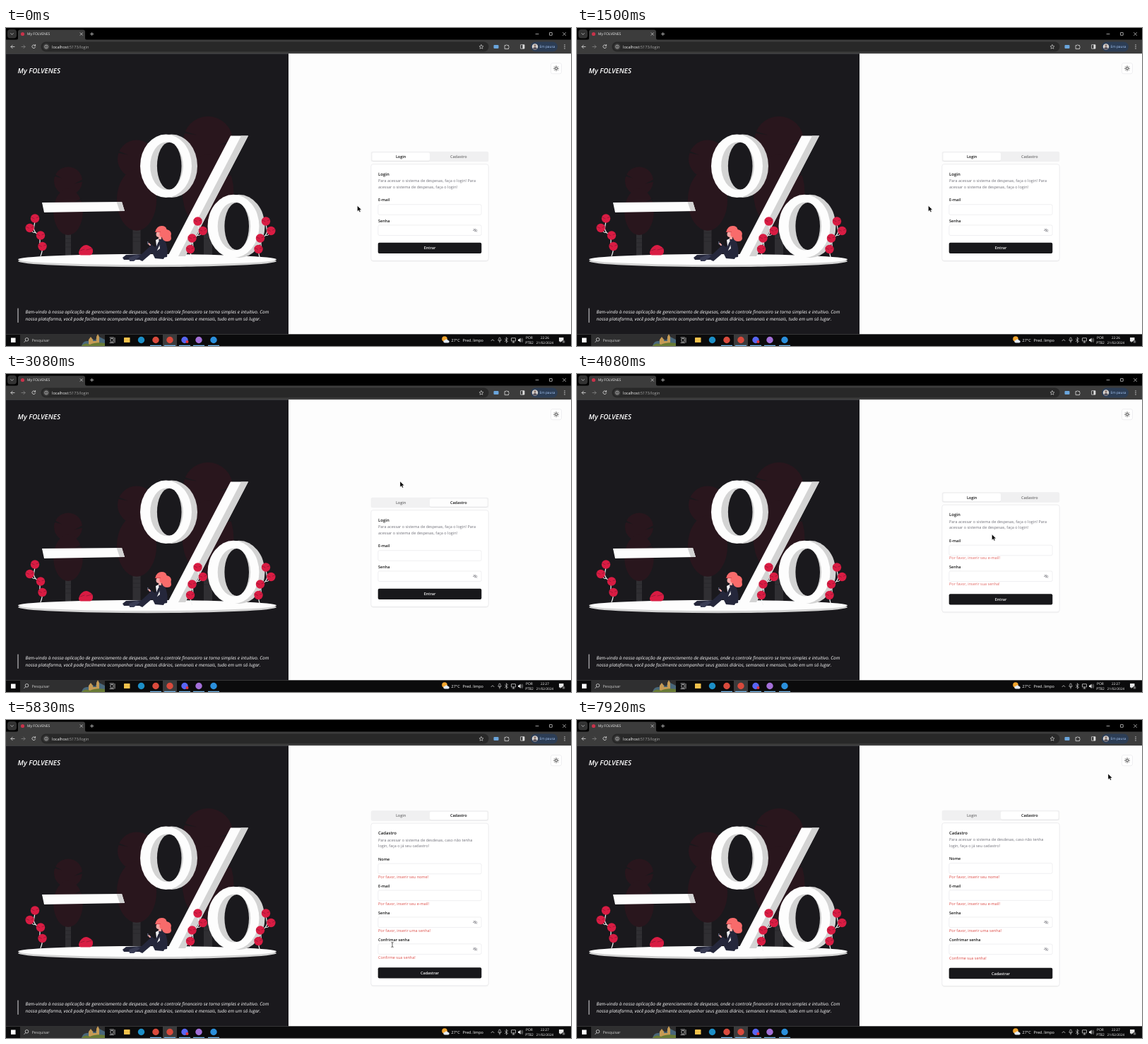
Write an HTML page that moves like this. It is 800 px wide and 450 px high and loops after 8 s.

```html
<!DOCTYPE html>
<html lang="pt">
<head>
<meta charset="utf-8">
<title>My FOLVENES</title>
<style>
html, body { margin: 0; height: 100%; overflow: hidden; background: #fdfdfd; }
svg { display: block; width: 100vw; height: 100vh; }
text { font-family: "Open Sans", "Noto Sans", sans-serif; font-size: 5.5px; text-rendering: geometricPrecision; white-space: pre; }
.mid { text-anchor: middle; }
.semi { font-weight: 600; }
.ital { font-style: italic; fill: #fff; }
.line { fill: none; stroke-linecap: round; stroke-linejoin: round; }
</style>
</head>
<body>
<svg id="stage" viewBox="0 0 800 450"></svg>
<script>
const LOOP = 8000, FONT = 5.5;
const stage = document.getElementById('stage');

const rect = (x, y, w, h, fill, r = 0, more = '') =>
  `<rect x="${x}" y="${y}" width="${w}" height="${h}" rx="${r}" fill="${fill}" ${more}/>`;
const oval = (x, y, rx, ry, fill) => `<ellipse cx="${x}" cy="${y}" rx="${rx}" ry="${ry}" fill="${fill}"/>`;
const dot = (x, y, r, fill) => oval(x, y, r, r, fill);
const shape = (d, fill, more = '') => `<path d="${d}" fill="${fill}" ${more}/>`;
const line = (d, color, w = .7) => `<path class="line" d="${d}" stroke="${color}" stroke-width="${w}"/>`;
const box = (x, y, w, h, color) => rect(x, y, w, h, 'none', .3, `stroke="${color}" stroke-width=".7"`);
const ring = (x, y, r, color, w = .7) => `<circle cx="${x}" cy="${y}" r="${r}" fill="none" stroke="${color}" stroke-width="${w}"/>`;
const text = (x, y, s, fill, size = FONT, cls = '', more = '') =>
  `<text x="${x}" y="${y}" fill="${fill}" style="font-size:${size}px" class="${cls}" ${more}>${s}</text>`;
const at = (x, y, s) => `<g transform="translate(${x} ${y})">${s}</g>`;

function browser() {
  const ink = '#dedede';
  return rect(0, 0, 800, 36.2, '#3c3c3c') + rect(0, 0, 800, 16.5, '#000') +
    rect(2, 2, 13, 12.5, '#333', 4) + line('M6.7 7.6l1.8 1.8 1.8-1.8', ink) +
    shape('M14 17q3 0 3-3V5.5q0-3 3-3h89q3 0 3 3V14q0 3 3 3z', '#3c3c3c') +
    dot(23.5, 8.5, 2.6, '#c8324a') + text(30, 10.4, 'My FOLVENES', '#eee', 5) +
    line('M105 6.8l3.4 3.4m0-3.4l-3.4 3.4M119.5 8.5h4.4m-2.2-2.2v4.4M750 8.5h4M788.5 6.5l4 4m0-4l-4 4', ink) +
    box(769.5, 6.5, 3.8, 3.8, ink) +
    line('M12 26.5H7m2.2-2.3L7 26.5l2.2 2.3', ink, .8) +
    line('M22 26.5h5m-2.2-2.3l2.2 2.3-2.2 2.3', '#858585', .8) +
    line('M41.3 24.8a2.4 2.4 0 1 0 .3 2.3M41.6 23.5v1.7h-1.7', ink, .8) +
    rect(49.5, 19.5, 634, 14, '#282828', 7) + dot(57, 26.5, 4.7, '#3c3c3c') +
    ring(57, 26.5, 2.4, ink, .6) + line('M57 26.3v1.3M57 25.2v.1', ink, .6) +
    text(65, 28.5, 'localhost<tspan fill="#a5a5a5">:5173/login</tspan>', '#f2f2f2', 5.6) +
    line('M673 23.7l.9 1.9 2.1.2-1.6 1.4.5 2.1-1.9-1.1-1.9 1.1.5-2.1-1.6-1.4 2.1-.2z', ink, .6) +
    rect(690.5, 24, 7, 5, '#6aa5dc', 1) +
    line('M706.5 24.5h1.5q.8-1.8 1.6 0h2v1.8q1.8.8 0 1.6v1.7h-5.1z', ink, .8) +
    box(728.5, 23.7, 5.5, 5.5, ink) + rect(731.5, 23.7, 2.5, 5.5, ink) +
    rect(743, 19.5, 38, 14, '#2c3d55', 7) + dot(749, 26.5, 4.2, '#d8d5d2') +
    shape('M745.8 29q3.2-3.8 6.4 0q-3.2 3-6.4 0z', '#55505a') + dot(749, 25, 1.7, '#8d7971') +
    text(755.5, 28.2, 'Em pausa', '#a9c9f8', 4.8) +
    [24, 26.5, 29].map(y => dot(791, y, .65, ink)).join('');
}

function tree(x, top, r, base, trunk) {
  const notch = (y, s) => shape(`M${x + s * r} ${y - 4}L${x + s * r * .45} ${y + 2}L${x + s * r} ${y - 1}z`, '#1a191d');
  const low = top + r * 1.8, leaf = '#29161d';
  return rect(x - trunk / 2, base - 10, trunk, 332 - base, '#302f33') +
    [4, 10, 16, 22].map(d => line(`M${x - trunk / 2} ${base + d}h${trunk}`, '#232227', .6)).join('') +
    dot(x, top + r, r, leaf) + oval(x, (low + base) / 2, r * 1.04, (base - low) / 2 + r * .25, leaf) +
    notch(top + r * .7, -1) + notch(top + r * 1.1, 1) + notch(low + r * .6, 1);
}

const zero = (x, y) => at(x, y,
  oval(8, 0, 36.5, 44.7, '#d3d3d3') + oval(0, 0, 36.5, 44.7, '#fdfdfd') +
  oval(1, 0, 23.3, 34, '#d3d3d3') + oval(4.7, 0, 17.3, 33.4, '#1a191d'));

function plant(x, y, flip) {
  const berry = ([dx, dy]) => at(x + dx * flip, y + dy,
    dot(0, 0, 6.2, '#d91c43') + line('M-5.6-1.8L-1 .3M5.6-2.2L2-.8', '#7c1730', .6));
  const stem = line('M0 0c0 12-3 12-1 17s9 7 8 16s-1 5 3 8q1 5-2 12', '#f5f5f5', 1.2) + line('M-7 13q2 8 7 7', '#f5f5f5', 1);
  return `<g transform="translate(${x} ${y}) scale(${flip} 1)">${stem}</g>` +
    [[0, 0], [-7.3, 13.5], [8, 24], [10.5, 39.5]].map(berry).join('');
}

function reader() {
  const navy = '#25273b', skin = '#f5a9a6';
  return shape('M228 317L212 313 205 308 192 320 170 321 165 325 167 328 189 328 193 330 207 318 211 326 223 327z', navy) +
    shape('M174 325l11-4 5 2-9 7-6 0z', '#393c54') +
    shape('M213 299q8-3 12 2q5 10 3 23l-13 2-4-12z', navy) +
    shape('M212 300l4-2 2 14-4 3z', '#f3f3f3') +
    line('M217 304l-4 9-9-6', navy, 3.2) + line('M204 307l-2-2', skin, 2) + rect(200, 302, 1.5, 4, '#55586e') +
    dot(216.5, 292, 4, skin) + rect(216, 294, 4, 5, skin) +
    shape('M211.5 288q2-8 9-8q6 0 7 5q8 2 6 9q2 8-5 8q-6 0-8-6q-4-1-3-7z', '#f86b6b') +
    line('M211.5 288.5h7', '#d94c53', 1.2);
}

function scene() {
  return rect(0, 36.2, 400, 397.2, '#1a191d') +
    text(16.5, 63.8, 'My FOLVENES', '#fff', 9.8, 'ital semi') +
    tree(88, 196.5, 20, 288, 8) + tree(185, 158.5, 27, 280, 11) + tree(286, 125, 35, 276, 12) +
    oval(200, 330, 183, 8.2, '#d3d3d3') + oval(200, 327.5, 183, 7.6, '#fdfdfd') +
    shape('M51 247L164 246 168 259 54 261z', '#fdfdfd') + shape('M156.5 246H164L168 259H161z', '#d3d3d3') +
    shape('M318 152.5H343L254 323H229z', '#fdfdfd') + shape('M333 152.5H343L254 323H244z', '#d3d3d3') +
    zero(226.5, 195.2) + zero(322, 280.5) +
    plant(41, 269.5, 1) + plant(271.5, 273.5, -1) + plant(368, 273.5, -1) +
    shape('M103 319q0-5 4-9q5-5 10-2q7 3 6 9q-1 4-4 4.5h-13q-2 0-3-2.5z', '#d91c43') +
    line('M105 315l6-2M114 314l8-2', '#7c1730', .6) + reader() +
    line('M17 397V416.5', '#f4f4f5', .9) +
    text(27.5, 404, 'Bem-vindo à nossa aplicação de gerenciamento de despesas, onde o controle financeiro se torna simples e intuitivo. Com', '#fff', 6.49, 'ital') +
    text(27.5, 414, 'nossa plataforma, você pode facilmente acompanhar seus gastos diários, semanais e mensais, tudo em um só lugar.', '#fff', 6.49, 'ital');
}

function themeButton() {
  let rays = '';
  for (let i = 0; i < 8; i++) {
    const c = Math.cos(i * Math.PI / 4), s = Math.sin(i * Math.PI / 4);
    rays += `M${779 + 2.7 * c} ${57.2 + 2.7 * s}L${779 + 3.5 * c} ${57.2 + 3.5 * s}`;
  }
  return rect(771.5, 49.7, 15, 15, '#fff', 2.3, 'stroke="#e4e4e7" stroke-width=".6"') +
    ring(779, 57.2, 1.6, '#222', .8) + line(rays, '#222', .8);
}

function taskbar() {
  const ink = '#e6e6e6';
  const apps = [[212, '#d94a3c'], [232, '#d94a3c'], [253, '#5865f2'], [273, '#a36fd8'], [294, '#2a8fdc']];
  return rect(0, 433.3, 800, 17, '#0b0b0c') + rect(7, 438.5, 6.5, 6.5, '#fff') +
    rect(20, 433.3, 120, 17, '#2f2f30') +
    ring(29.5, 440.8, 2.3, '#ddd', .8) + line('M27.8 442.6l-2 2', '#ddd', .8) +
    text(36.5, 443.7, 'Pesquisar', '#c9c9c9') +
    shape('M107 450q2-8 9-7l4-4 6 3 4-6 10 5v9z', '#49677a') + shape('M117 450v-9l3-4 3 4v2h5v-6l2-4 2 4v13z', '#c69b55') +
    shape('M107 450q5-6 12-2q8-4 21-2v4z', '#687a34') +
    box(148, 439.5, 4, 4.5, ink) + line('M147 438h5.5M147 445.5h5.5M154 438.5v6.5', ink) +
    rect(167, 438, 8.5, 7, '#f2c14b', .6) + dot(191.5, 441.5, 4.7, '#1c8fc7') +
    rect(222, 433.3, 20, 17, '#3b3b3c') +
    apps.map(([x, c]) => dot(x, 441.5, 4.7, c) + rect(x - 8, 448.8, 16, 1.2, '#76b9ed')).join('') +
    dot(256.5, 444, 2, '#e5353f') +
    dot(621, 440, 3.8, '#f2a52e') + shape('M621 445.5a1.9 1.9 0 0 1 .5-3.8a2.4 2.4 0 0 1 4.4.4a1.7 1.7 0 0 1 .2 3.4z', '#e3ebf5') +
    text(630.5, 443.7, '27°C', '#fff') + text(646.5, 443.7, 'Pred. limpo', '#fff') +
    line('M687 442.7l2-2 2 2', ink) + rect(697.8, 438, 2.4, 4.5, 'none', 1.2, `stroke="${ink}" stroke-width=".6"`) +
    line('M696.5 441.5q2.5 4 5 0M699 443.5v1.8M708.5 438v7M706.5 440l4 3.5-2 1.5M706.5 443.5l4-3.5-2-2', ink, .6) +
    box(715.5, 438.7, 6, 4.3, ink) + line('M717 445h3M718.5 443v2', ink, .6) +
    shape('M725 440.5h1.5l2-2v6.5l-2-2H725z', ink) + line('M729.5 440q1 1.7 0 3.5M731 439q1.5 2.7 0 5.5', ink, .5) +
    text(741, 439.7, 'POR', '#fff', 4.9, 'mid') + text(741, 447.2, 'PTB2', '#fff', 4.9, 'mid') +
    text(763, 439.7, '22:26', '#fff', 4.7, 'mid', 'id="clock"') + text(763, 447.2, '21/02/2024', '#fff', 4.6, 'mid') +
    shape('M783 438h6.5v5.5h-3.2l-1.6 1.8v-1.8H783z', ink) + dot(789.5, 444, 2.3, '#3a3a3b') + text(789.5, 445.3, '4', '#fff', 3.6, 'mid');
}

const pages = {
  login: {
    title: 'Login', send: 'Entrar',
    lines: ['Para acessar o sistema de despesas, faça o login! Para', 'acessar o sistema de despesas, faça o login!'],
    fields: [['E-mail', 'Por favor, inserir seu e-mail!'], ['Senha', 'Por favor, inserir sua senha!', 1]]
  },
  join: {
    title: 'Cadastro', send: 'Cadastrar',
    lines: ['Para acessar o sistema de desdesas, caso não tenha', 'login, faça o já seu cadastro!'],
    fields: [['Nome', 'Por favor, inserir seu nome!'], ['E-mail', 'Por favor, inserir seu e-mail!'],
      ['Senha', 'Por favor, inserir uma senha!', 1], ['Confrimar senha', 'Confirme sua senha!', 1]]
  }
};
const clamp = v => Math.max(0, Math.min(1, v));
const mix = (a, b, k) => a + (b - a) * k;
const grey = (a, b, k) => { const v = Math.round(mix(a, b, k)); return `rgb(${v},${v},${v + 1})`; };

// Times of the clicks on tabs and submit buttons
const JOIN_1 = 2400, LOGIN = 3070, SUBMIT_1 = 3920, JOIN_2 = 4420, SUBMIT_2 = 5590;
const fade = (t, start) => clamp((t - start) / 150);
const grow = (t, start) => 1 - (1 - clamp((t - start) / 350)) ** 3;

const eye = (x, y) => at(x, y,
  line('M-2.6 0q2.6-3.6 5.2 0q-2.6 3.6-5.2 0zM-2.2-2.2l4.4 4.4', '#71717a', .6) + dot(0, 0, .7, '#71717a'));

function form(t, mx, my) {
  const joining = t >= JOIN_2 || (t >= JOIN_1 && t < LOGIN);
  const page = joining ? pages.join : pages.login;
  const open = grow(t, joining ? SUBMIT_2 : SUBMIT_1);
  const step = 29.2 + 8.95 * open, n = page.fields.length;
  const h = 78.1 + step * n, top = 261 - h / 2;
  const k = fade(t, JOIN_1) - fade(t, LOGIN) + fade(t, JOIN_2);
  const tab = (x, label, on) =>
    rect(x, top - 16.4, 81.7, 11.5, '#fff', 1.8, `opacity="${on}" filter="url(#soft)"`) +
    text(x + 40.8, top - 8.7, label, grey(113, 15, on), FONT, 'mid semi');
  let s = rect(516.7, top - 18, 166.6, 14.6, '#f0f0f1', 2.5) + tab(518.3, 'Login', 1 - k) + tab(600, 'Cadastro', k) +
    rect(516.9, top, 166.2, h, '#fff', 3, 'stroke="#e4e4e7" stroke-width=".6" filter="url(#soft)"') +
    text(527, top + 16.2, page.title, '#111', 6, 'semi') +
    page.lines.map((l, i) => text(527, top + 25.7 + i * 8.35, l, '#71717a')).join('');
  page.fields.forEach(([label, error, secret], i) => {
    const y = top + 50.5 + i * step;
    s += text(527, y + 2.2, label, '#111', FONT, 'semi') +
      rect(526.9, y + 6.5, 146.2, 14.6, '#fff', 2, 'stroke="#e4e4e7" stroke-width=".6"');
    if (secret) s += eye(664.5, y + 13.8);
    if (open > 0) s += text(527, y + 19 + 8.95 * open, error, '#dc4a45', FONT, '', `opacity="${open}"`);
  });
  const mid = top + 60.2 + step * n;
  const over = mx > 527 && mx < 673 && Math.abs(my - mid) < 7.5;
  return s + rect(526.7, mid - 7.7, 146.6, 15.4, over ? '#2f2f32' : '#18181b', 2) +
    text(600, mid + 2.1, page.send, '#fafafa', FONT, 'mid semi');
}

// Pointer stops: time, x, y
const route = [
  [0, 497.5, 251.5], [1580, 497.5, 251.5], [2300, 640, 184], [2480, 640, 184], [2950, 558, 152], [3100, 558, 152],
  [3700, 600, 312], [3920, 600, 312], [4080, 587.5, 227], [4350, 640, 175], [4500, 640, 175], [4920, 589.5, 224],
  [5300, 600, 342], [5620, 600, 342], [5830, 547, 318], [6420, 734, 115], [6800, 790, 82], [7000, 781, 76],
  [7170, 781, 76], [7900, 752, 76.2], [8000, 752, 76.2]
];
function pointer(t) {
  const i = route.findIndex(p => p[0] > t), [t0, x0, y0] = route[i - 1], [t1, x1, y1] = route[i];
  const u = (t - t0) / (t1 - t0), k = u * u * (3 - 2 * u);
  return [mix(x0, x1, k), mix(y0, y1, k)];
}
function cursor(t, x, y) {
  const beam = t > 5750 && t < 5950;
  return at(x, y, beam ? line('M-1.2-3.4q1.2 0 1.2.7q0-.7 1.2-.7M0-2.7V2.7M-1.2 3.4q1.2 0 1.2-.7q0 .7 1.2.7', '#222', .7)
    : shape('M0 0V8l1.9-1.7 1.2 2.7 1.4-.6-1.2-2.6h2.5z', '#000', 'stroke="#fff" stroke-width=".4"'));
}

stage.innerHTML = '<filter id="soft" x="-5%" y="-10%" width="110%" height="125%"><feDropShadow dx="0" dy=".5" stdDeviation=".6" flood-opacity=".12"/></filter>' +
  rect(0, 0, 800, 450, '#fdfdfd') + browser() + scene() + themeButton() + taskbar() + '<g id="live"></g>';
const live = document.getElementById('live'), clock = document.getElementById('clock');

function draw(now) {
  const t = now % LOOP, [x, y] = pointer(t);
  live.innerHTML = form(t, x, y) + cursor(t, x, y);
  clock.textContent = t < 2500 ? '22:26' : '22:27';
  requestAnimationFrame(draw);
}
requestAnimationFrame(draw);
</script>
</body>
</html>
```
